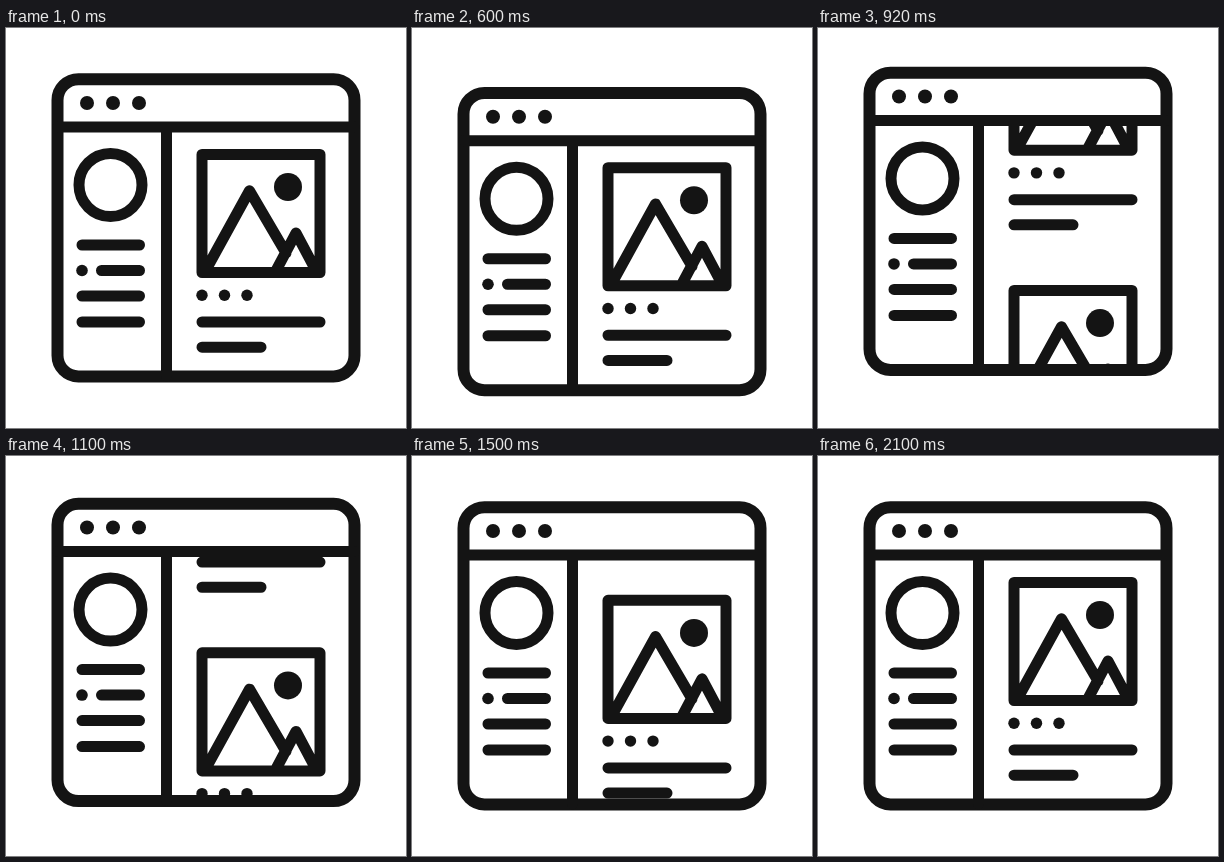
These frames come from a looping animation (400x400 px, 2120 ms). An HTML page:

```html
<!DOCTYPE html>
<html lang="en">
<head>
<meta charset="utf-8">
<title>Scrolling page icon</title>
<style>
  html, body { margin: 0; width: 100%; height: 100%; overflow: hidden; background: #fff; }
  svg { display: block; width: 100vw; height: 100vh; }
  .line { fill: none; stroke: #141414; stroke-width: 11; stroke-linecap: round; stroke-linejoin: round; }
  .dot { fill: #141414; }
</style>
</head>
<body>
<svg viewBox="0 0 400 400">
  <defs>
    <clipPath id="view"><rect x="161" y="99" width="188" height="250"/></clipPath>
    <g id="post">
      <path class="line" d="M196 126.4H314V244.5H196Z M199 243.5L243.5 162.7L280 225 M269 244.5L290 205L311 244.5 M196 294H314 M196 319.2H255"/>
      <circle class="dot" cx="282" cy="159" r="14"/>
      <g class="dot">
        <circle cx="196" cy="267.2" r="5.7"/>
        <circle cx="218.5" cy="267.2" r="5.7"/>
        <circle cx="241" cy="267.2" r="5.7"/>
      </g>
    </g>
  </defs>
  <g id="page">
    <g clip-path="url(#view)">
      <g id="feed">
        <use href="#post"/>
        <use href="#post" y="258.4"/>
      </g>
    </g>
    <g class="line">
      <rect x="51.5" y="51.2" width="297" height="297.3" rx="21" stroke-width="12"/>
      <path d="M52 99H348 M160.5 99V348"/>
      <circle cx="104.5" cy="157" r="31.5"/>
      <path d="M76 217H133.5 M95.5 242.5H133.5 M76 268H133.5 M76 294H133.5"/>
    </g>
    <g class="dot">
      <circle cx="81" cy="75" r="7"/>
      <circle cx="107" cy="75" r="7"/>
      <circle cx="133" cy="75" r="7"/>
      <circle cx="76" cy="242.5" r="5.8"/>
    </g>
  </g>
</svg>
<script>
  const LOOP = 2120;
  const page = document.getElementById('page');
  const feed = document.getElementById('feed');

  // cubic-bezier(1/3, 0, 0, 1), solved by bisection
  function ease(x) {
    if (x <= 0) return 0;
    if (x >= 1) return 1;
    let lo = 0, hi = 1;
    for (let i = 0; i < 24; i++) {
      const s = (lo + hi) / 2;
      if (s * (1 - s) ** 2 + s ** 3 < x) lo = s; else hi = s;
    }
    return lo * lo * (3 - 2 * lo);
  }

  const move = (t, start, end, distance) => distance * ease((t - start) / (end - start));

  function draw(now) {
    const t = now % LOOP;
    const bounce = move(t, 89, 560, 14.8) + move(t, 560, 960, -21.4) + move(t, 960, 1540, 6.6);
    const scroll = move(t, 563, 2094, -258.4);
    page.setAttribute('transform', `translate(0 ${bounce})`);
    feed.setAttribute('transform', `translate(0 ${scroll})`);
    requestAnimationFrame(draw);
  }
  draw(performance.now());
</script>
</body>
</html>
```
